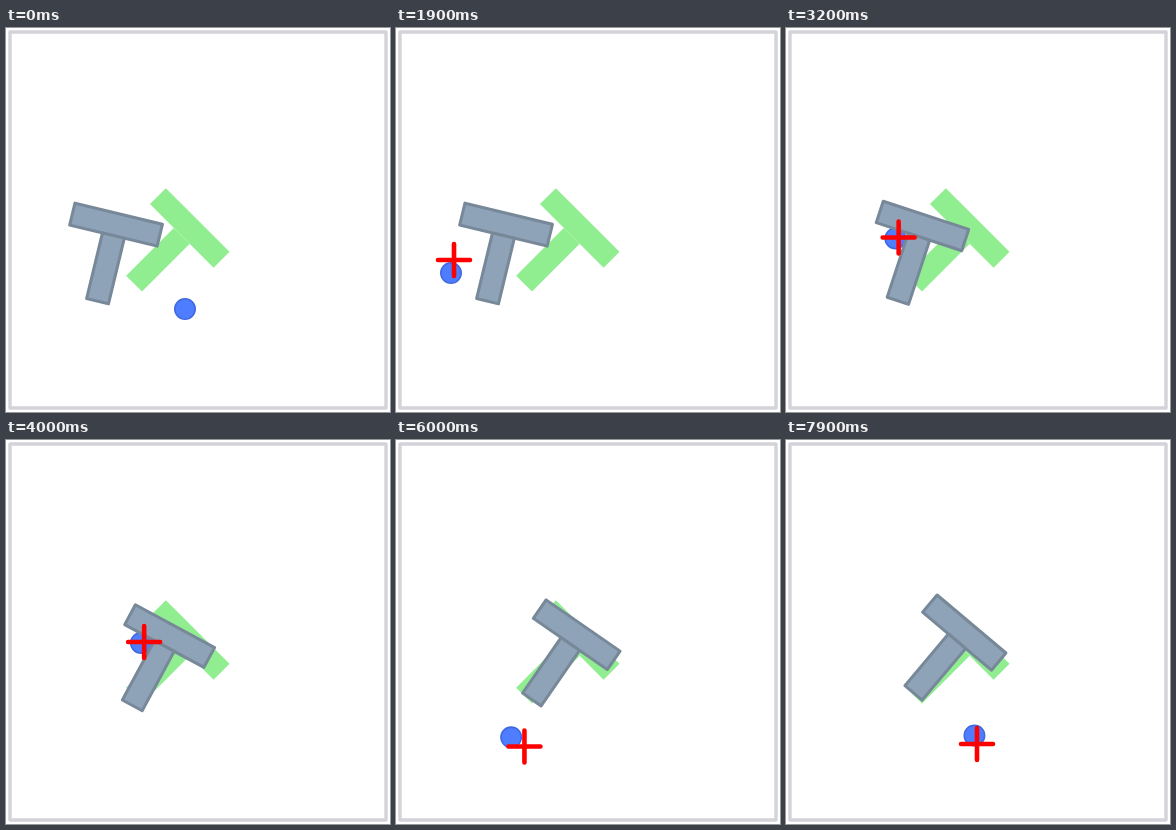
These frames come from a looping animation (384 by 384 pixels, 8000 ms). An HTML page with a canvas:

```html
<!DOCTYPE html>
<html>
<head>
<meta charset="utf-8">
<style>
html, body { margin: 0; width: 100%; height: 100%; overflow: hidden; background: #fff; }
canvas { display: block; }
</style>
</head>
<body>
<canvas id="stage" width="384" height="384"></canvas>
<script>
const ctx = document.getElementById('stage').getContext('2d');
const LOOP = 8000, STEP = 100;

// Waypoints of the ball: time, x, y. The cross leads the ball by one step.
const route = [
  [0, 179, 281], [700, 137, 317], [1300, 68, 298], [1900, 55, 245], [2000, 58, 232],
  [2400, 82, 218], [3250, 111, 210], [4050, 136.5, 202.5], [4500, 150, 199],
  [5100, 147, 199], [5300, 116, 202], [5400, 93, 208], [5700, 82, 258],
  [6200, 140, 311], [6700, 183, 275], [6800, 181, 256], [7200, 172, 239], [8000, 191, 304]
];

// Poses of the block between pushes: time, middle of the top edge, angle in degrees.
const poses = [
  [2300, 112.7, 185.7, 13.6], [3200, 140, 187.3, 18.2], [4500, 187.1, 185.5, 34.7],
  [6900, 187.1, 185.5, 34.7], [7300, 185.5, 184, 40.1]
];

function segment(keys, t) {
  let i = 0;
  while (i < keys.length - 2 && t >= keys[i + 1][0]) i++;
  return i;
}

function linear(keys, t) {
  const i = segment(keys, t), a = keys[i], b = keys[i + 1];
  const u = Math.min(1, Math.max(0, (t - a[0]) / (b[0] - a[0])));
  return a.slice(1).map((v, k) => v + (b[k + 1] - v) * u);
}

// Hermite curve through unevenly timed keys
function smooth(keys, t) {
  const i = segment(keys, t), a = keys[i], b = keys[i + 1];
  const before = keys[i - 1] || a, after = keys[i + 2] || b;
  const d = b[0] - a[0], u = (t - a[0]) / d, v = 1 - u;
  return [1, 2].map(k => {
    const m0 = (b[k] - before[k]) / (b[0] - before[0]) * d;
    const m1 = (after[k] - a[k]) / (after[0] - a[0]) * d;
    return v * v * ((1 + 2 * u) * a[k] + u * m0) + u * u * ((1 + 2 * v) * b[k] - v * m1);
  });
}

function pen(color, width) {
  ctx.strokeStyle = color;
  ctx.lineWidth = width;
}

function tee(x, y, degrees, fill, outline) {
  ctx.save();
  ctx.translate(x, y);
  ctx.rotate(degrees * Math.PI / 180);
  ctx.fillStyle = fill;
  for (const box of [[-45, 0, 90, 22.5], [-11.25, 22.5, 22.5, 67.5]]) {
    ctx.fillRect(...box);
    if (outline) {
      pen(outline, 3);
      ctx.strokeRect(...box);
    }
  }
  ctx.restore();
}

function ball(x, y) {
  ctx.beginPath();
  ctx.arc(x, y, 10.2, 0, 2 * Math.PI);
  ctx.fillStyle = '#4e7eff';
  ctx.fill();
  pen('#4169e1', 1.6);
  ctx.stroke();
}

function cross(x, y) {
  ctx.beginPath();
  ctx.moveTo(x - 16, y);
  ctx.lineTo(x + 16, y);
  ctx.moveTo(x, y - 16);
  ctx.lineTo(x, y + 16);
  pen('#f00', 4.6);
  ctx.stroke();
}

function draw(t) {
  ctx.fillStyle = '#fff';
  ctx.fillRect(0, 0, 384, 384);
  pen('#d3d3d9', 3.4);
  ctx.strokeRect(4, 4, 376, 376);
  tee(191.7, 192, 45, '#90ee90');
  ball(...smooth(route, t));
  tee(...linear(poses, t), '#8fa3b8', '#778899');
  if (t) cross(...smooth(route, t + STEP));
}

ctx.lineJoin = ctx.lineCap = 'round';
const start = performance.now();
function tick() {
  const t = (performance.now() - start) % LOOP;
  draw(Math.floor(t / STEP) * STEP);
  requestAnimationFrame(tick);
}
tick();
</script>
</body>
</html>
```
